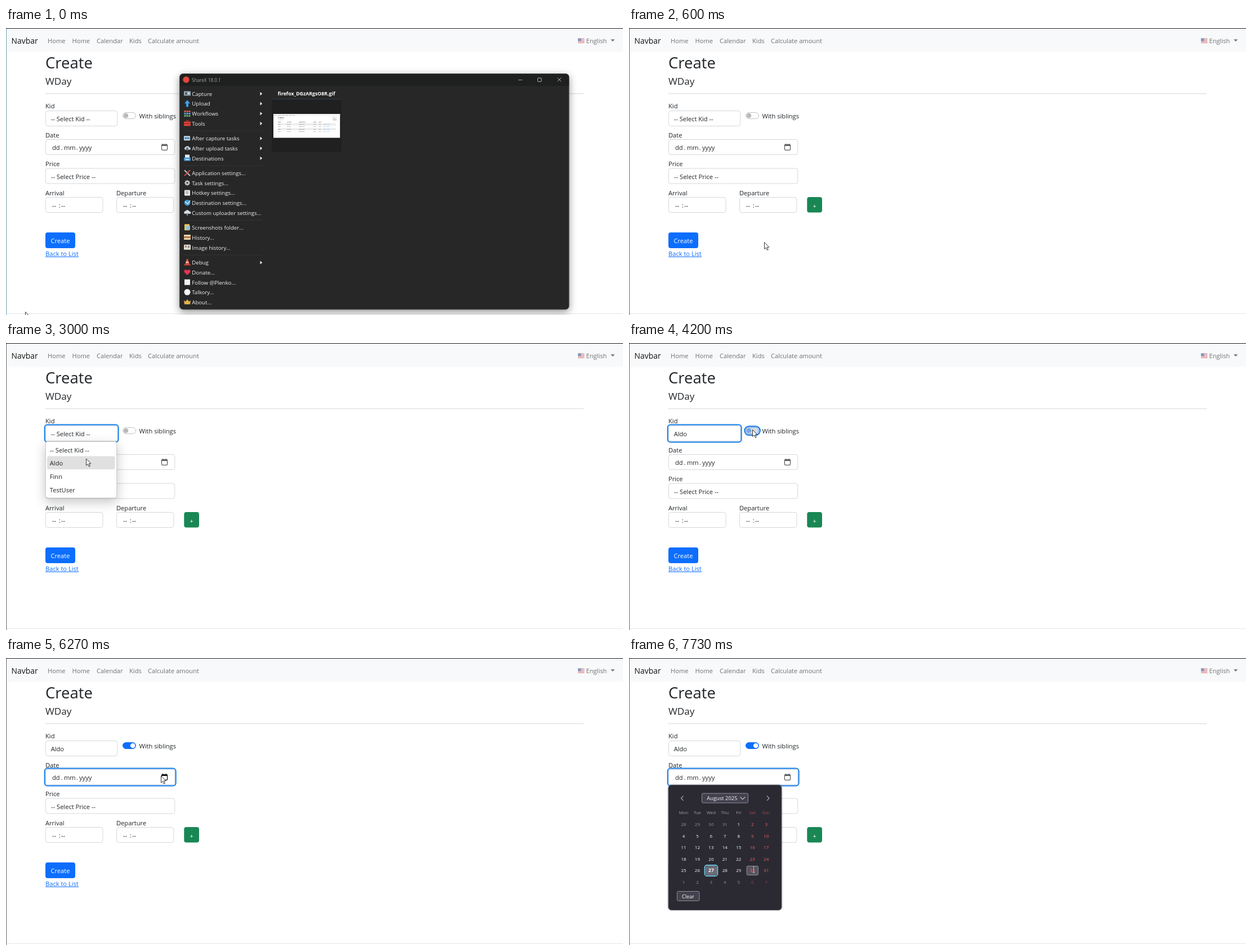
Animation, 1096 px wide and 511 px high, one loop 8 s. Source, as an HTML page:

```html
<!DOCTYPE html>
<html lang="en">
<head>
<meta charset="utf-8">
<title>Create WDay</title>
<style>
  html, body { margin: 0; width: 100%; height: 100%; overflow: hidden; background: #fff; }
  svg { display: block; width: 100vw; height: 100vh; }
  text { font-family: "Open Sans", "Noto Sans", sans-serif; white-space: pre; }
</style>
</head>
<body>
<svg id="stage" viewBox="0 0 1096 511"></svg>
<script>
const LOOP = 8000, TICKS_PER_SECOND = 15;
const INK = '#212529', BLUE = '#0d6efd', FOCUS = '#0f7be8', BORDER = '#d3d7dc';
const KIDS = ['-- Select Kid --', 'Aldo', 'Finn', 'TestUser'];

const text = (x, y, s, size = 11.12, fill = INK, extra = '') =>
  `<text x="${x}" y="${y}" font-size="${size}" fill="${fill}" ${extra}>${s}</text>`;
const centred = (x, y, s, size, fill, extra = '') =>
  text(x, y, s, size, fill, 'text-anchor="middle" ' + extra);
const rect = (x, y, w, h, fill, r = 0, extra = '') =>
  `<rect x="${x}" y="${y}" width="${w}" height="${h}" rx="${r}" fill="${fill}" ${extra}/>`;
const frame = (x, y, w, h, fill, stroke, r = 4, width = 1) =>
  rect(x + width / 2, y + width / 2, w - width, h - width, fill, r, `stroke="${stroke}" stroke-width="${width}"`);
const dot = (x, y, r, fill) => `<circle cx="${x}" cy="${y}" r="${r}" fill="${fill}"/>`;
const shape = (d, fill) => `<path d="${d}" fill="${fill}"/>`;
const line = (d, stroke, width = 1, extra = '') =>
  `<path d="${d}" fill="none" stroke="${stroke}" stroke-width="${width}" ${extra}/>`;
const group = (content, attrs) => `<g ${attrs}>${content}</g>`;
const clamp = v => Math.min(1, Math.max(0, v));

// Pointer path: tick, x, y
const PATH = [
  [0, 34, 505.5], [5, 240, 381.5], [9, 240, 381.5], [14, 305, 330], [21, 375, 181], [22, 154, 154.5],
  [26, 154, 154.5], [35, 150, 172], [38, 150, 172], [45, 142, 206], [54, 142, 206],
  [59, 219, 154.5], [66, 219, 154.5], [75, 88, 222], [83, 272, 210], [85, 272, 210],
  [87, 275, 210], [103, 275, 210], [107, 170, 300], [110, 99, 345], [112, 112, 402],
  [116, 221.5, 377]
];

function pointerAt(tick) {
  const next = PATH.findIndex(key => key[0] > tick);
  if (next < 0) return PATH.at(-1).slice(1);
  const [t0, x0, y0] = PATH[next - 1], [t1, x1, y1] = PATH[next];
  const u = (tick - t0) / (t1 - t0), e = u * u * (3 - 2 * u);
  return [x0 + (x1 - x0) * e, y0 + (y1 - y0) * e];
}

const arrow = (x, y) =>
  `<path transform="translate(${x + .5} ${y})" d="M0 0V12L2.8 9.5L4.9 14L6.8 13.2L4.8 8.8H8.3Z" fill="#fff" stroke="#222" stroke-width=".9"/>`;
const beam = (x, y) => {
  const d = `M${x - 2.5} ${y - 6}h5M${x} ${y - 6}v11M${x - 2.5} ${y + 5}h5`;
  return line(d, '#222', 1.8) + line(d, '#e4e4e4', .9);
};

function navbar() {
  const grey = '#707172';
  const links = [[74, 'Home'], [117.5, 'Home'], [161, 'Calendar'], [219, 'Kids'], [252, 'Calculate amount']];
  let flag = rect(1016, 18.5, 11.5, 8.5, '#f4eeee', 1);
  for (let i = 0; i < 4; i++) flag += rect(1016, 18.5 + i * 2.4, 11.5, 1.2, '#d0424d');
  flag += rect(1016, 18.5, 5.5, 4.8, '#3a5da0');
  return rect(0, 0, 1096, 42, '#f8f9fa') + text(9.5, 28, 'Navbar', 13.9, '#111') +
    links.map(([x, s]) => text(x, 27, s, 11.12, grey)).join('') +
    group(flag, 'opacity=".62"') + text(1030.5, 27, 'English', 11.12, grey) +
    shape('M1074 20.3h7.4l-3.7 3.8z', grey);
}

const staticPage = rect(0, 0, 1096, 511, '#fff') + navbar() +
  text(70, 72, 'Create', 27.5) + text(70, 101, 'WDay', 17.1) +
  rect(70, 116.5, 956, 1, '#d3d5d6') + rect(0, 508, 1096, 1, '#e4e5e7') +
  [[70, 143, 'Kid'], [70, 195, 'Date'], [70, 246, 'Price'], [70, 297.5, 'Arrival'], [196, 297.5, 'Departure'],
   [236.5, 161, 'With siblings']].map(a => text(...a)).join('') +
  frame(70, 147, 128.3, 28, '#fff', BORDER) + frame(70, 198, 230.3, 28, '#fff', BORDER) +
  frame(70, 249.5, 230.3, 28, '#fff', BORDER) + text(80, 268.5, '-- Select Price --') +
  [70, 196].map(x => frame(x, 301, 102.5, 28, '#fff', BORDER) +
    text(x + 12, 320, '--') + text(x + 23.7, 320, ':') + text(x + 28, 320, '--')).join('') +
  rect(316.3, 301, 26.7, 27.5, '#198754', 4) + centred(329.6, 320.5, '+', 11.12, '#fff') +
  rect(70, 364, 53, 28, BLUE, 4) + text(79.5, 383, 'Create', 11.12, '#fff') +
  text(70, 406, 'Back to List', 11.12, BLUE) + rect(70, 407, 59, 1, BLUE);

// Focus outline with a white gap around a control
const ring = (x, y, w, h, r) => frame(x - 2.3, y - 2.5, w + 4.6, h + 5, 'none', FOCUS, r, 2);

function toggle(tick) {
  const pressed = tick === 63 || tick === 64, on = clamp((tick - 64) / 2);
  const focused = tick >= 63 && tick < 87;
  const edge = on ? BLUE : pressed ? '#7da7dd' : '#bfc0c1';
  const knob = on ? '#fff' : pressed ? '#79a8e3' : '#b9babb';
  return (focused ? frame(204.3, 147.2, 29.6, 17.8, pressed ? '#d3dbe8' : '#fff', FOCUS, 8, 2) : '') +
    frame(207, 150, 24, 12, on ? BLUE : pressed ? '#d3dbe8' : '#fff', edge, 5.8) +
    dot(213 + 12.2 * on, 156, 4.3, knob);
}

function dateField(tick) {
  const picked = tick >= 87 && tick < 94, iconInk = tick >= 87 && tick < 104 ? '#111' : '#5d5d60';
  return (tick >= 87 ? ring(70, 198, 230.3, 28, 5) : '') +
    (picked ? rect(79.5, 204.5, 18, 15.5, '#0078d7') : '') +
    text(82, 217, 'dd', 11.12, picked ? '#fff' : INK) + text(97.5, 217, '.') + text(103, 217, 'mm') +
    text(124.8, 217, '.') + text(130, 217, 'yyyy') +
    frame(275.8, 207, 11.4, 11, 'none', iconInk, 1.6, 1.3) + rect(276, 207.4, 11, 2.6, iconInk, 1) +
    rect(278, 205.8, 1.3, 2, iconInk) + rect(283.6, 205.8, 1.3, 2, iconInk);
}

function kidList(tick, y) {
  const hot = y >= 202 ? 1 : 0;
  const panel = frame(69.7, 175, 127.6, 101.5, '#fff', '#c3c3c6', 4);
  return group(group(panel, 'style="filter:drop-shadow(0 7px 10px rgba(0,0,0,.22))"') +
    rect(73, 201.6 - (1 - hot) * 23.8, 120.6, 23.5, '#e0e0e1', 3) +
    KIDS.map((kid, i) => text(77.8, 194.5 + i * 23.8, kid)).join(''),
    `opacity="${clamp((tick - 26) / 2)}"`);
}

function datePicker(tick, x, y) {
  const white = '#fbfbfe', dim = '#918f98', edge = '#8f8f9d';
  const colX = c => 97 + 24.45 * c, rowY = r => 296 + 20.62 * r;
  let out = group(frame(69.7, 226, 201.6, 223, '#2b2a33', '#3b3a43', 5),
    'style="filter:drop-shadow(0 0 1.5px rgba(0,0,0,.45))"');
  out += line('M96.5 245.5l-4 4.2l4 4.2M245 245.5l4 4.2l-4 4.2', '#b5b4bc', 1.1);
  out += frame(129, 240.5, 83, 18, '#42414d', edge, 2) + text(138.3, 253, 'August 2025', 9.4, white) +
    line('M197.7 247.5l4.2 4.2l4.2-4.2', '#c8c7ce', 1.1);
  ['Mon', 'Tue', 'Wed', 'Thu', 'Fri', 'Sat', 'Sun'].forEach((day, c) => {
    out += centred(colX(c), 278.4, day, 7.7, c > 4 ? '#a8474f' : '#a09fa7');
  });
  const col = Math.round((x - 97) / 24.45), row = Math.round((y - 296) / 20.62);
  const hover = tick >= 104 && col >= 0 && col < 7 && row >= 0 && row < 6 ? row * 7 + col : -1;
  for (let i = 0; i < 42; i++) {
    const c = i % 7, cx = colX(c), cy = rowY(Math.floor(i / 7));
    const date = new Date(2025, 6, 28 + i), inside = date.getMonth() === 7;
    const today = inside && date.getDate() === 27;
    const ink = c > 4 ? (inside ? '#f75f64' : '#97434b') : inside ? white : dim;
    if (today) out += frame(cx - 12.3, cy - 10.5, 24.6, 21, '#2b2a33', '#70d3ee', 4, 1.7) +
      frame(cx - 9.8, cy - 8, 19.6, 16, '#6c6a75', '#85838e', 2);
    else if (i === hover) out += frame(cx - 10.6, cy - 8.6, 21.4, 17.2, '#56555f', edge, 2);
    out += centred(cx, cy + 3, date.getDate(), today ? 8.5 : 8, ink, today ? 'font-weight="700"' : '');
  }
  out += frame(85, 415, 40.4, 17.8, '#42414d', edge, 2) + centred(105, 427.6, 'Clear', 9.1, white);
  return group(out, `opacity="${tick === 97 ? .6 : tick === 98 ? .94 : 1}"`);
}

const MENU = [
  [['Capture', rect(0, 2, 12, 8, '#9aa9b5', 1) + rect(2, 4, 8, 4, '#4a5c6b') + dot(8, 6, 2, '#d5e4ee')],
   ['Upload', shape('M6 0l5 6H8v6H4V6H1z', '#3fa0f0')],
   ['Workflows', [0, 1, 2].map(i => rect(i * 4 + .5, 1, 3, 3, '#e25b4f') +
     rect(i * 4 + .5, 5, 3, 3, '#58a4dc') + rect(i * 4 + .5, 9, 3, 3, '#63b467')).join('')],
   ['Tools', rect(0, 3, 12, 8, '#d8433b', 1) + rect(0, 6, 12, 1, '#7d211d') + line('M4 3V1h4v2', '#ba342d')]],
  [['After capture tasks', rect(0, 2, 11, 8, '#d7e3ec', 1) + rect(1, 4, 9, 4, '#5997c8')],
   ['After upload tasks', shape('M2 9a3 3 0 0 1 1-5a4 4 0 0 1 7 1a2 2 0 0 1 0 4z', '#c9d4e2') + shape('M6 4l3 4H7v3H5V8H3z', '#58677c')],
   ['Destinations', rect(2, 0, 8, 6, '#e5edf5') + rect(0, 5, 12, 6, '#4b9be0', 1) + rect(3, 8, 6, 1.5, '#d9edff')]],
  [['Application settings...', line('M1 1l10 10', '#c7ccd1', 2) + line('M11 1L1 11', '#d15043', 2)],
   ['Task settings...', dot(6, 6, 4, '#b7bec4') + line('M6 1v10M1 6h10M2.5 2.5l7 7M9.5 2.5l-7 7', '#c9cfd4', 1.4) + dot(6, 6, 1.7, '#454545')],
   ['Hotkey settings...', rect(1, 1, 10, 10, '#e9e9e9', 1) + rect(3, 3, 5, 5, '#b8b8b8')],
   ['Destination settings...', dot(6, 6, 5.3, '#3e9bdc') + line('M2 4l5 4l4-6', '#d5e9f5', 1.6)],
   ['Custom uploader settings...', shape('M1 8a3 3 0 0 1 2-5a4 4 0 0 1 7 1a2 2 0 0 1 1 4z', '#d5dbe0') + rect(5, 7, 2, 4, '#91a0ab')]],
  [['Screenshots folder...', rect(1, 0, 9, 11, '#efc64f', 1) + rect(4, 3, 7, 7, '#8fc1e4')],
   ['History...', rect(0, 1, 12, 9, '#ead6ac', 1) + rect(0, 4, 12, 3, '#b7774e')],
   ['Image history...', rect(0, 1, 12, 9, '#e4dfd2', 1) + rect(2, 3, 3, 3, '#b86853') + rect(7, 3, 3, 4, '#7e8c98')]],
  [['Debug', shape('M5 0h2l3 10H2z', '#e45346') + rect(3.5, 5, 5, 1.6, '#eee') + rect(0, 9.5, 12, 2, '#c43c32')],
   ['Donate...', shape('M6 11L1 6C-1 3 3-1 6 3C9-1 13 3 11 6z', '#e8354d')],
   ['Follow @Plenko...', rect(1, 1, 10, 10, '#f2f2f2')],
   ['Talkory...', dot(6, 6, 5.5, '#f5f5f5')],
   ['About...', shape('M0 3l3 2l3-4l3 4l3-2l-1 7H1z', '#e3b04b')]]
];

function thumbnail() {
  let out = centred(533.7, 120, 'firefox_DGzARgsO8R.gif', 8.75, '#fff', 'font-weight="700"') +
    rect(473, 126, 122, 1, '#2d3944') + rect(472, 128, 124, 93, '#202020') + rect(475, 153, 118.3, 42.5, '#fff') +
    rect(475, 153, 118.3, 4, '#f5f6f7') + text(476.5, 156, 'Site   Home  Home  Days  Kids  Total', 2.2, '#555') +
    text(483, 161, 'Index', 4.3, '#333') + text(483, 164, 'Add new', 2, BLUE) +
    rect(580, 158, 8, 7, '#f0f0f0') + text(581, 161, 'Day', 2, '#555') + text(581, 164, 'Month', 2, '#222');
  for (let i = 0; i < 5; i++) {
    const y = 168 + i * 4.2;
    if (i % 2) out += rect(482, y - 2.7, 104, 4, '#eee');
    [[483, 'Date'], [499, 'Arrival'], [520, 'Departure'], [546, 'Sum'], [556, 'Kid']].forEach(([x, s]) =>
      out += text(x, y, i ? s.toLowerCase() : s, 2.3, '#333', i ? '' : 'font-weight="700"'));
    if (i) out += text(564, y, 'Edit | Drop', 2.1, BLUE);
  }
  return out;
}

function captureWindow() {
  const panel = rect(308.5, 81.5, 691.5, 419.5, '#272727', 6, 'stroke="#484848"');
  let out = group(panel, 'style="filter:drop-shadow(0 4px 7px rgba(0,0,0,.42))"') +
    shape('M309 103V88q0-6 6-6H994q6 0 6 6V103z', '#1e1f1f') +
    dot(320, 92, 5.7, '#e2483d') + text(330, 95.5, 'ShareX 18.0.1', 8.2, '#a3a3a3') +
    line('M910 92.5h7M979.5 88.5l7 7M986.5 88.5l-7 7', '#b5b5b5', .9) + frame(944, 88.5, 7.5, 7.5, 'none', '#b5b5b5', 1);
  let row = 0;
  MENU.forEach((items, section) => {
    if (section) out += rect(316, 107.4 + row * 17.67 + (section - .5) * 8.9, 139, 1, '#343434');
    items.forEach(([label, icon], i) => {
      const y = 120.6 + row++ * 17.67 + section * 8.9;
      out += group(icon, `transform="translate(316 ${y - 10})"`) + text(330.3, y, label, 9.65, '#f0f0f0');
      if (section < 2 || section === 4 && i === 0) out += shape(`M451.5 ${y - 6.8}l3.6 3.2l-3.6 3.2z`, '#f0f0f0');
    });
  });
  return out + thumbnail();
}

const windowLayer = captureWindow();

function scene(tick) {
  const [x, y] = pointerAt(tick);
  const listOpen = tick >= 27 && tick < 54, pickerOpen = tick >= 97;
  return staticPage +
    rect(0, 0, 1096, 1, '#1c1b22') + rect(0, 1, 1, 510, tick < 3 ? '#6fa3b5' : '#656569') +
    (tick >= 26 && tick < 64 ? ring(70, 147, 128.3, 28, 5) : '') +
    text(79.7, 166, KIDS[tick < 54 ? 0 : 1]) + toggle(tick) + dateField(tick) +
    (tick < 9 ? windowLayer : '') +
    (listOpen ? kidList(tick, y) : '') + (pickerOpen ? datePicker(tick, x, y) : '') +
    (tick >= 116 ? beam(x, y) : arrow(x, y));
}

const stage = document.getElementById('stage');
let shown = -1;
function draw(now) {
  const tick = Math.floor((now % LOOP + 5) * TICKS_PER_SECOND / 1000) % 120;
  if (tick !== shown) stage.innerHTML = scene(shown = tick);
  requestAnimationFrame(draw);
}
draw(0);
</script>
</body>
</html>
```
